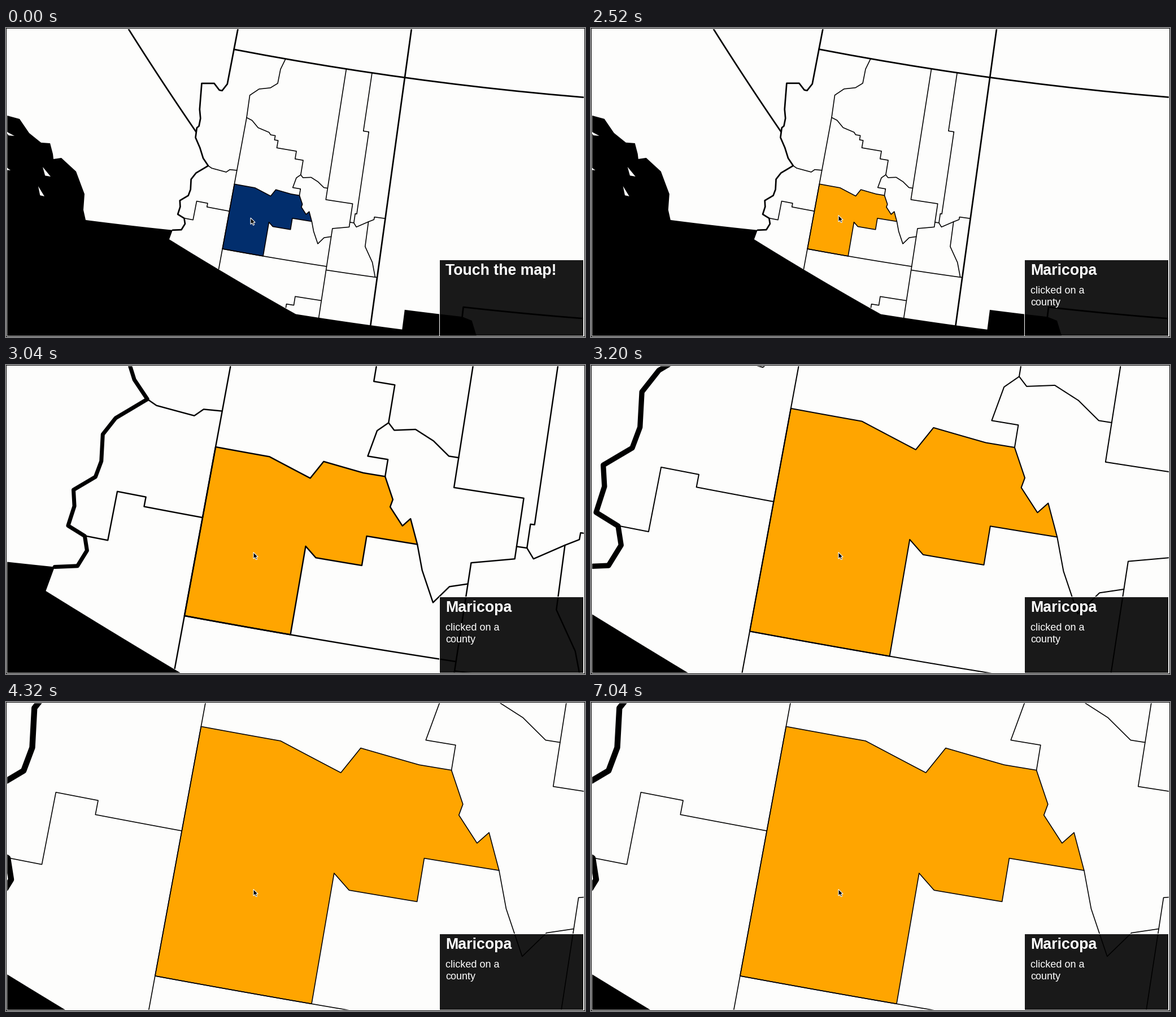
Recreate the animation shown at these times as a matplotlib script. Size 1025x547 px, loop 7080 ms.

```python
import numpy as np
import matplotlib.pyplot as plt
from matplotlib.animation import FuncAnimation
from matplotlib.patches import Polygon, Rectangle
from matplotlib.transforms import Affine2D

W, H, DPI = 1025, 547, 100
LOOP, STEP = 7080, 40
PT = 72 / DPI  # points per pixel

PAPER, BLUE, ORANGE = "#fdfdfc", "#022e6d", "#ffa500"
CLICK = 600
ZOOM_START, ZOOM_TIME, ZOOM_MAX = 2475, 1082, 3.85
CENTER = (425, 358)
COUNTY_WIDTH, STATE_WIDTH = 1.6, 2.7


def project(path):
    """Conic projection of (degrees west, degrees north) to stage pixels."""
    lon, lat = np.array(path, float).T
    knots = np.arange(len(lon))
    fine = np.linspace(0, len(lon) - 1, 12 * (len(lon) - 1) + 1)
    angle = np.radians(0.60285 * (np.interp(fine, knots, lon) - 96))
    radius = 5826 + 78.06 * (37 - np.interp(fine, knots, lat))
    return np.column_stack([1503.4 - radius * np.sin(angle),
                            radius * np.cos(angle) - 5683.4])


def survey(lon, lat, *stops, axis=1):
    """Walk along meridians (axis 1) and parallels (axis 0) in turn."""
    point = [lon, lat]
    path = [tuple(point)]
    for stop in stops:
        point[axis] = stop
        axis = 1 - axis
        path.append(tuple(point))
    return path


def cubic_in_out(t):
    t = min(max(t, 0), 1)
    return 4 * t ** 3 if t < 0.5 else 1 - 4 * (1 - t) ** 3


# Meridians and parallels shared by several borders
WEST, EAST, MID, NAVAJO = 113.333, 109.05, 110.455, 110.757
NORTH, SOUTH, BASE, MEXICO = 37, 32.506, 34, 31.33

COUNTY = [*survey(WEST, BASE, 112.75, axis=0), (112.283, 33.877),
          (112.172, 34.04), *survey(111.736, BASE, 111.5, axis=0),
          (111.379, 33.813), (111.395, 33.746), (111.234, 33.6),
          (111.161, 33.673),
          *survey(111.047, 33.462, 111.59, 33.203, 112.082, axis=0),
          *survey(112.208, 33.287, SOUTH, WEST)]

COUNTY_LINES = [
    survey(WEST, 35.533, 32.04),
    [(112.534, NORTH), (112.626, 36.75), (112.635, 36.422), (112.819, 36.293),
     (113.131, 36.221), (113.36, 36.044), (WEST, 35.533), (113.168, 35.493),
     (112.963, 35.354), (112.634, 35.294),
     *survey(112.58, 35.245, 112.446, 35.147, 112.344, 34.978, 111.786, 34.8,
             111.557, 34.466, axis=0)],
    [(114.143, 34.298), (114.035, 34.259), (113.617, 34.233),
     (113.532, 34.303), (WEST, 34.317)],
    survey(WEST, 33.375, 113.962, 33.46, 114.27, 33.027, 114.517, axis=0),
    [*survey(111.5, BASE, 34.15, 111.718), (111.664, 34.382),
     (111.557, 34.466), (111.484, 34.41), (111.26, 34.447), (111.051, 34.373),
     *survey(110.863, 34.263, NAVAJO, axis=0)],
    [*survey(NAVAJO, NORTH, BASE, 110.005, 33.466), (MID, 33.376),
     (MID, MEXICO)],
    [(MID, 33.19), (110.643, 33.142), (110.788, 32.983), (110.954, 33.246),
     (111.047, 33.462)],
    [*survey(110.005, NORTH, 35.666, 109.85, 33.785, 109.894, 33.575, 110.005)],
    [(109.894, 33.575), (109.809, 33.49), (109.5, 33.647), (109.357, 33.713),
     (109.354, 33.773), (EAST, 33.773)],
    [(109.5, 33.647), (109.493, 33.08), (109.236, 32.747), (109.107, 32.43)],
    survey(WEST, SOUTH, MID, axis=0),
    survey(MID, 32.424, EAST, axis=0),
    survey(MID, 31.723, 111.17, 31.522, 111.37, 31.44, axis=0),
]

RIVER = [(114.05, 38), (114.05, 36.2), (114.16, 36.03), (114.24, 36.03),
         (114.422, 36.158), (114.771, 36.103), (114.684, 35.515),
         (114.611, 35.319), (114.611, 35.14), (114.66, 35.093),
         (114.643, 34.87), (114.466, 34.662), (114.32, 34.443),
         (114.143, 34.298), (114.437, 34.084), (114.538, 33.923),
         (114.498, 33.692), (114.527, 33.548), (114.728, 33.4),
         (114.685, 33.263), (114.71, 33.085), (114.517, 33.025),
         (114.464, 32.905), (114.531, 32.757), (114.764, 32.71)]

STATE_LINES = [
    RIVER,
    [(117.2, NORTH), (114.66, 35)],
    survey(114.05, NORTH, 103, axis=0),
    survey(EAST, 38.5, MEXICO),
    survey(106.63, 31.785, 32, 103),
]

COAST = [(119.923, 34.407), (119.563, 34.403), (119.207, 34.146),
         (118.823, 34), (118.575, 34.034), (118.43, 33.813),
         (118.381, 33.704), (118.177, 33.771), (117.695, 33.548),
         (117.329, 33.092), (117.263, 32.736), (117.141, 32.523)]

OUTSIDE = [*COAST, RIVER[-1], (114.805, 32.49),
           *survey(111.079, MEXICO, 108.195, 31.78, 106.63, axis=0),
           (106.36, 31.717), *survey(106.1, 31.2, 29, 121, 34.4)]

# Wedge-shaped islands: corner, then the stretch to the far tip
ISLANDS = [((0, 183), (15, 8)), ((-4, 243), (12, 9)),
           ((65, 246), (14, 17)), ((57, 280), (11, 18))]

POINTER = [(0, 0), (0, 11.5), (2.7, 9.2), (4.6, 13.2), (6.6, 12.2),
           (4.8, 8.4), (8.2, 8.2)]

fig = plt.figure(figsize=(W / DPI, H / DPI), dpi=DPI, facecolor=PAPER)
ax = fig.add_axes([0, 0, 1, 1])
ax.set(xlim=(0, W), ylim=(H, 0))
ax.axis("off")

zoom = Affine2D()
map_space = zoom + ax.transData
pointer_shift = Affine2D()


def fill(points, color, zorder, **kw):
    return ax.add_patch(Polygon(points, closed=True, fc=color, zorder=zorder,
                                **{"lw": 0, **kw}))


def stroke(path, zorder):
    line, = ax.plot(*project(path).T, color="black", zorder=zorder,
                    transform=map_space, solid_joinstyle="round",
                    solid_capstyle="round", snap=False)
    return line


def box(x0, y0, x1, y1, color, zorder):
    """One-pixel outline just inside the given edges."""
    ax.add_patch(Rectangle((x0 + 0.5, y0 + 0.5), x1 - x0 - 1, y1 - y0 - 1,
                           fill=False, ec=color, lw=PT, zorder=zorder,
                           joinstyle="miter", snap=False))


def label(y, size, weight="normal"):
    return ax.text(778, y, "", color="white", size=size * PT, weight=weight,
                   family="Liberation Sans", va="baseline", zorder=8)


fill(project(OUTSIDE), "black", 1, transform=map_space)
for corner, stretch in ISLANDS:
    wedge = np.array(corner) + np.array(stretch) * [(0, 0), (1, 1), (0.3, 0.9)]
    fill(wedge, PAPER, 2, transform=map_space)
county = fill(project(COUNTY), BLUE, 2, transform=map_space, ec="black",
              joinstyle="round")
county_lines = [stroke(path, 3) for path in COUNTY_LINES]
state_lines = [stroke(path, 4) for path in STATE_LINES]

# information panel
ax.add_patch(Rectangle((768, 411), 254, 134, fc="black", alpha=0.9, lw=0,
                       zorder=6))
box(767, 410, 1023, 546, "white", 7)
title = label(437, 26.7, "bold")
details = [label(469.5, 18), label(491, 18)]

fill(POINTER, "black", 9, ec="white", lw=1.1 * PT,
     transform=pointer_shift + ax.transData)

# stage frame
box(1, 1, W - 1, H - 1, "white", 10)
box(0, 0, W, H, "black", 11)


def draw(i):
    now = i * STEP
    e = cubic_in_out((now - ZOOM_START) / ZOOM_TIME)
    k = 1 + (ZOOM_MAX - 1) * e
    cx, cy = CENTER
    zoom.clear().translate(-cx, -cy).scale(k).translate(cx, cy)

    # county borders thin out as the map grows, state borders do not
    thin = COUNTY_WIDTH * (1 + (1 / ZOOM_MAX - 1) * e) * k * PT
    for artist in [county, *county_lines]:
        artist.set_linewidth(thin)
    for line in state_lines:
        line.set_linewidth(STATE_WIDTH * k * PT)

    clicked = now >= CLICK
    county.set_facecolor(ORANGE if clicked else BLUE)
    title.set_text("Maricopa" if clicked else "Touch the map!")
    for text, words in zip(details, ("clicked on a", "county")):
        text.set_text(words if clicked else "")

    m = cubic_in_out((now - 120) / 320)
    pointer_shift.clear().translate(433 + 5 * m, 336 - 4.5 * m)
    return []


anim = FuncAnimation(fig, draw, frames=LOOP // STEP, interval=STEP,
                     init_func=lambda: draw(0), repeat=True, repeat_delay=0,
                     blit=False)
plt.show()
```
